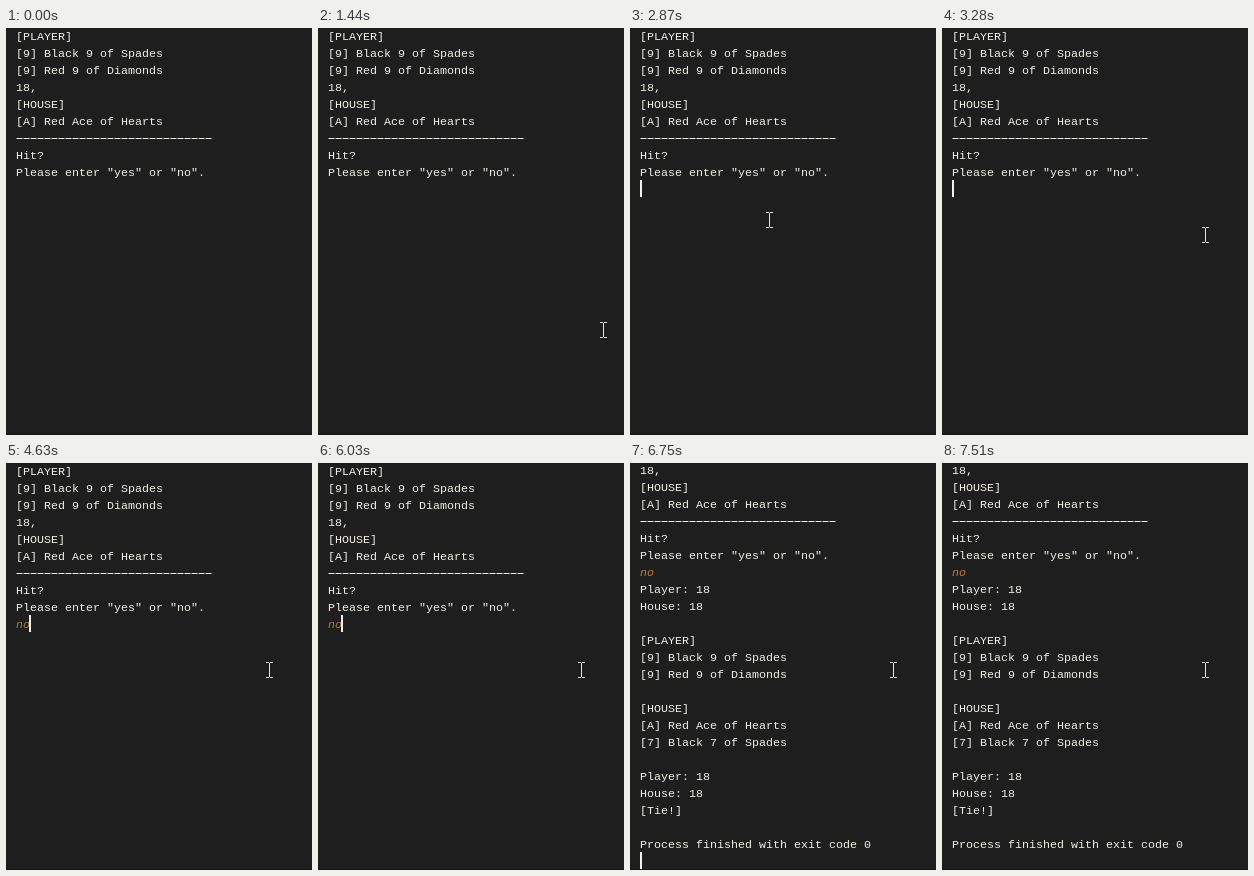
Animation, 306 px wide and 407 px high, one loop 8 s. Source, as an HTML page with a canvas:

```html
<!DOCTYPE html>
<html lang="en">
<head>
<meta charset="utf-8">
<title>Blackjack console</title>
<style>
html, body { margin: 0; width: 100%; height: 100%; overflow: hidden; background: #1e1e1e; }
canvas { display: block; width: 306px; height: 407px; }
</style>
</head>
<body>
<canvas id="stage" width="306" height="407"></canvas>
<script>
const ctx = document.getElementById('stage').getContext('2d', { alpha: false });
const LOOP = 8000, LEFT = 10, CELL = 7, ROW = 17, BASE = 12;
const FACE = '11.667px "Liberation Mono", "Courier New", monospace';
const INK = '#f2efe8';

const hand = ['[9] Black 9 of Spades', '[9] Red 9 of Diamonds'];
const score = ['Player: 18', 'House: 18'];
const ace = '[A] Red Ace of Hearts';
const prompt = ['[PLAYER]', ...hand, '18,', '[HOUSE]', ace,
  '-'.repeat(28), 'Hit?', 'Please enter "yes" or "no".'];
const result = [...score, '', '[PLAYER]', ...hand, '',
  '[HOUSE]', ace, '[7] Black 7 of Spades', '', ...score, '[Tie!]'];
const INPUT_ROW = prompt.length;

// Caret: start time, row, column; row -1 hides it
const carets = [
  [0, -1, 0], [2570, 9, 0], [3570, -1, 0], [4050, 9, 0], [4450, 9, 1],
  [4630, 9, 2], [5530, -1, 0], [6030, 9, 2], [6080, 10, 0],
  [6270, 24, 0], [6750, 26, 0], [7510, -1, 0]
];

const mix = (a, b, p) => Math.round(a + (b - a) * p);
const smooth = p => p * p * (3 - 2 * p);

function drawLine(text, row, scroll, color = INK, style = '') {
  const y = BASE + row * ROW - scroll;
  ctx.font = style + FACE;
  ctx.fillStyle = color;
  [...text].forEach((ch, i) => {
    const x = LEFT + i * CELL;
    if (ch === '-') ctx.fillRect(x + 0.5, y - 4, 6, 1);
    else if (ch !== ' ') ctx.fillText(ch, x, y);
  });
}

function drawCaret(t, scroll) {
  const [, row, col] = carets.filter(c => c[0] <= t).pop();
  if (row < 0) return;
  ctx.fillStyle = '#f0f0f0';
  ctx.fillRect(Math.max(LEFT, 9 + col * CELL), row * ROW - 1 - scroll, 2, ROW);
}

// Top left corner of the mouse pointer
function pointerAt(t) {
  if (t < 1440) return null;
  if (t < 2120) {
    const p = Math.floor((t - 1440) / 27.2) * 27.2 / 680;
    const e = 1 - Math.pow(1 - p, 2.45);
    return [mix(282, 123, e), mix(294, 181, e)];
  }
  if (t >= 2510 && t < 2620) return [129, 184];
  if (t < 2830) return [123, 181];
  if (t < 3280) {
    const step = Math.floor((t - 2830) / 20) * 20;
    const e = smooth(Math.min(1, (step + 23) / 333));
    return [mix(123, 259, e), mix(181, 200, Math.pow(e, 0.8))];
  }
  return [260, 199];
}

function drawPointer(t) {
  const at = pointerAt(t);
  if (!at) return;
  const [x, y] = at;
  ctx.fillStyle = '#e4e4e4';
  for (const dy of [0, 15]) {
    ctx.fillRect(x, y + dy, 3, 1);
    ctx.fillRect(x + 4, y + dy, 3, 1);
  }
  ctx.fillRect(x + 3, y + 1, 1, 14);
}

function draw(t) {
  const scroll = t < 6270 ? 0 : t < 6750 ? 18 : 52;
  const typed = 'no'.slice(0, t < 4450 ? 0 : t < 4630 ? 1 : 2);
  ctx.fillStyle = '#1e1e1e';
  ctx.fillRect(0, 0, 306, 407);
  prompt.forEach((s, i) => drawLine(s, i, scroll));
  drawLine(typed, INPUT_ROW, scroll, t < 6080 ? '#a87a44' : '#cc782c', 'italic ');
  if (t >= 6270) result.forEach((s, i) => drawLine(s, INPUT_ROW + 1 + i, scroll));
  if (t >= 6750) drawLine('Process finished with exit code 0', 25, scroll);
  drawCaret(t, scroll);
  drawPointer(t);
  ctx.fillStyle = '#161616';
  ctx.fillRect(0, 406, 306, 1);
}

const start = performance.now();
function tick() {
  draw((performance.now() - start) % LOOP);
  requestAnimationFrame(tick);
}
tick();
</script>
</body>
</html>
```
